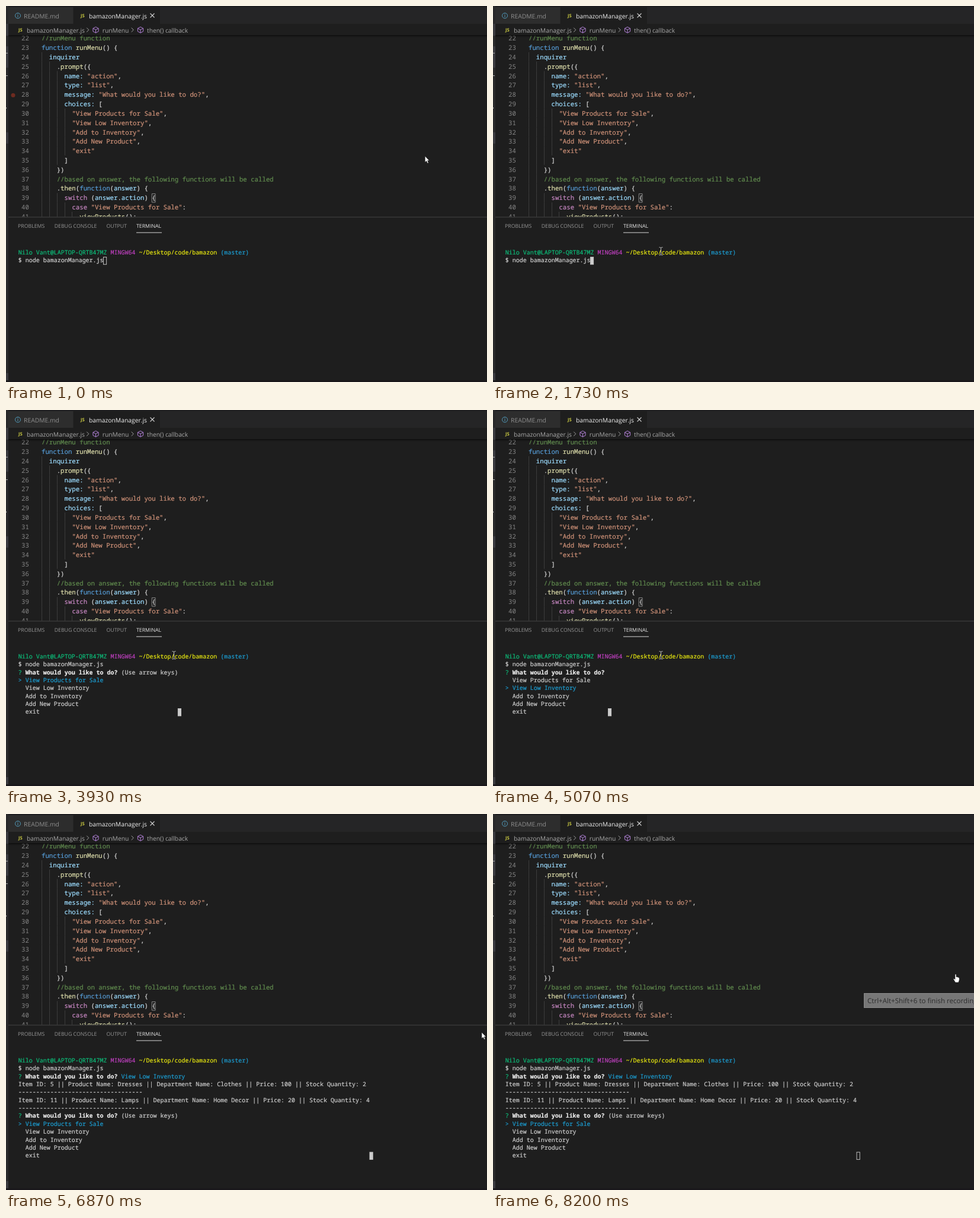
Animation, 812 px wide and 634 px high, one loop 8270 ms. Source, as an HTML page:

```html
<!DOCTYPE html>
<html lang="en">
<head>
<meta charset="utf-8">
<title>Editor and terminal</title>
<style>
html, body { margin: 0; width: 100%; height: 100%; overflow: hidden; background: #1e1e1e; }
svg { display: block; width: 812px; height: 634px; }
text { white-space: pre; text-rendering: geometricPrecision; }
.ui { font: 10.33px "Open Sans", "Noto Sans", sans-serif; fill: #a9a9a9; }
.panel { font-size: 8.75px; fill: #969696; }
.js { font: bold 7.6px "Open Sans", sans-serif; fill: #cbcb41; }
.mono, .mono tspan { fill: currentColor; stroke: currentColor; stroke-width: .22px; }
.code { font: 10.71px "Noto Sans Mono", "DejaVu Sans Mono", monospace; color: #d4d4d4; }
.term { font: 9.99px "Noto Sans Mono", "DejaVu Sans Mono", monospace; color: #cccccc; }
.num { color: #858585; stroke-width: 0; }
.line { fill: none; stroke-linejoin: round; }
</style>
</head>
<body>
<svg viewBox="0 0 812 634">
  <defs>
    <clipPath id="editorClip"><rect y="49" width="812" height="306.5"/></clipPath>
    <linearGradient id="shade" x2="0" y2="1">
      <stop stop-color="#000" stop-opacity=".55"/><stop offset="1" stop-color="#000" stop-opacity="0"/>
    </linearGradient>
    <g id="cube" class="line" stroke="#b180d7">
      <path d="M0-5 4.6-2.6V2.6L0 5-4.6 2.6V-2.6ZM-4.6-2.6 0-.2 4.6-2.6M0-.2V5"/>
    </g>
    <path id="chevron" class="line" stroke="#a0a0a0" d="M-1.8-3.6 1.8 0-1.8 3.6"/>
  </defs>

  <rect width="812" height="634" fill="#1e1e1e"/>
  <rect width="812" height="30" fill="#252526"/>
  <rect x="4" y="2" width="109" height="28" fill="#2d2d2d"/>
  <rect x="114" y="2" width="146" height="28" fill="#1e1e1e"/>
  <rect width="812" height="1.5" fill="#1a1a1c"/>

  <g class="line" stroke="#519aba"><circle cx="20" cy="16.3" r="4.5"/><path d="M20 15.3v3.6M20 13.1v1.2"/></g>
  <text class="ui" x="30" y="20.7" style="fill:#8f8f8f">README.md</text>
  <text class="js" x="126" y="19.2">JS</text>
  <text class="ui" x="140" y="20.7" style="fill:#f0f0f0">bamazonManager.js</text>
  <path class="line" stroke="#d0d0d0" stroke-width="1.1" d="M243.5 12.5l7 7m0-7l-7 7"/>

  <text class="js" x="21" y="43">JS</text>
  <text class="ui" x="35" y="44.5">bamazonManager.js</text>
  <use href="#chevron" x="138" y="40.3"/><use href="#cube" x="151.5" y="40.3"/>
  <text class="ui" x="162.7" y="44.5">runMenu</text>
  <use href="#chevron" x="213.5" y="40.3"/><use href="#cube" x="227" y="40.3"/>
  <text class="ui" x="238" y="44.5">then() callback</text>

  <g id="editor" clip-path="url(#editorClip)"></g>
  <rect x="4" y="49" width="808" height="4" fill="url(#shade)"/>
  <rect x="246.3" y="316.6" width="5.8" height="14.4" class="line" stroke="#888"/>
  <circle id="hint" cx="12" cy="150.5" r="3.5" fill="#6e2b20"/>

  <rect x="4" y="355.5" width="808" height="1" fill="#444"/>
  <g class="ui">
    <text class="panel" x="20" y="374.3">PROBLEMS</text>
    <text class="panel" x="81.7" y="374.3">DEBUG CONSOLE</text>
    <text class="panel" x="169.5" y="374.3">OUTPUT</text>
    <text class="panel" x="220" y="374.3" style="fill:#e7e7e7">TERMINAL</text>
  </g>
  <rect x="220" y="381.6" width="43" height="1" fill="#d8d8d8"/>

  <rect width="4" height="634" fill="#29292a"/>
  <path fill="#3a3a3e" d="M0 30h4v20H0zM0 68h4v36H0zM0 213h4v19H0zM0 619h4v12H0z"/>
  <path fill="#aaa" d="M0 79h3v1H0zM0 117h3v1H0zM0 171h1v2H0z"/>
  <rect y="631.5" width="812" height="2.5" fill="#19171b"/>

  <g id="terminal"></g>
  <rect id="caret" width="5.2" height="12.4" stroke="#cccccc" stroke-width=".9"/>

  <g id="tooltip">
    <rect x="626.5" y="302.5" width="200" height="24" fill="#777" stroke="#8c8c8c"/>
    <text class="ui" x="632" y="319" style="font-size:11.6px;fill:#2c2c2c">Ctrl+Alt+Shift+6 to finish recording</text>
  </g>

  <g id="mouse">
    <path id="arrow" fill="#fff" stroke="#111" stroke-width=".6" d="M0 0V10.6L2.5 8.4 4.2 12.2 6 11.4 4.4 7.7H7.4Z"/>
    <path id="beam" class="line" stroke="#c4c4c4" d="M-3-6H-1L0-5 1-6H3M0-5V6M-3 7H-1L0 6 1 7H3"/>
    <path id="hand" fill="#fff" stroke="#111" stroke-width=".5" d="M-2-6.4Q-1-7.8 0-6.4V-2.2Q1.2-3 2-1.9 3.2-2.4 3.8-1.3 5.2-1.5 5.2 0V3L3.8 7H-1.4L-4.6 1.8Q-4.8.2-3.2.8L-2 2Z"/>
  </g>
</svg>

<script>
const LOOP = 8270;
const CODE = { x: 60, y: 58.2, char: 6.426, row: 15.83 };
const TERM = { x: 20.8, y: 419, char: 5.994, row: 13.35 };
const COLORS = {
  k: '#569cd6', f: '#dcdcaa', v: '#9cdcfe', s: '#ce9178', p: '#c586c0', c: '#608b4e', w: '#d4d4d4',
  g: '#0dbc79', m: '#bc3fbc', y: '#e5e510', b: '#1c9cd0', B: '#e8e8e8', t: '#cccccc'
};
const $ = id => document.getElementById(id);
const escape = s => s.replace(/&/g, '&amp;').replace(/</g, '&lt;');

// "~k" switches to colour k; an upper-case key is also bold.
function spans(line) {
  const [plain, ...parts] = line.split(/~(\w)/);
  let out = escape(plain);
  for (let i = 0; i < parts.length; i += 2) {
    const weight = parts[i] === 'B' ? ' font-weight="bold"' : '';
    out += `<tspan style="color:${COLORS[parts[i]]}"${weight}>${escape(parts[i + 1])}</tspan>`;
  }
  return out;
}
const textLine = (cls, x, y, line) => `<text class="mono ${cls}" x="${x}" y="${y}">${spans(line)}</text>`;

const source = [
  '~c//runMenu function',
  '~kfunction ~frunMenu~w() {',
  '  ~vinquirer',
  '    .~fprompt~w({',
  '      ~vname: ~s"action"~w,',
  '      ~vtype: ~s"list"~w,',
  '      ~vmessage: ~s"What would you like to do?"~w,',
  '      ~vchoices: ~w[',
  '        ~s"View Products for Sale"~w,',
  '        ~s"View Low Inventory"~w,',
  '        ~s"Add to Inventory"~w,',
  '        ~s"Add New Product"~w,',
  '        ~s"exit"',
  '      ]',
  '    })',
  '    ~c//based on answer, the following functions will be called',
  '    .~fthen~w(~kfunction~w(~vanswer~w) {',
  '      ~pswitch ~w(~vanswer~w.~vaction~w) {',
  '        ~pcase ~s"View Products for Sale"~w:',
  '          ~fviewProducts~w();'
];

function drawEditor() {
  $('editor').innerHTML = source.map((line, i) => {
    const y = CODE.y + i * CODE.row;
    const indent = line.search(/\S/);
    let out = textLine('code num', 26, y, String(22 + i));
    for (let col = 0; col < indent; col += 2) {
      const x = Math.round(CODE.x + col * CODE.char);
      out += `<rect x="${x}" y="${y - 12}" width="1" height="${CODE.row}" fill="#3c3c3c"/>`;
    }
    return out + textLine('code', CODE.x, y, line);
  }).join('');
}

const question = '~g? ~BWhat would you like to do? ';
const choices = ['View Products for Sale', 'View Low Inventory', 'Add to Inventory', 'Add New Product', 'exit'];
const menu = (picked, note = '') => [
  `${question}~t${note}`,
  ...choices.map((c, i) => i === picked ? `~b> ${c}` : `  ${c}`)
];
const item = (id, product, department, price, stock) =>
  `Item ID: ${id} || Product Name: ${product} || Department Name: ${department} || Price: ${price} || Stock Quantity: ${stock}`;
const rule = '-'.repeat(35);
const arrowKeys = '(Use arrow keys)';
const command = [
  '~gNilo Vant@LAPTOP-QRTB47MZ ~mMINGW64 ~y~/Desktop/code/bamazon ~b(master)',
  '$ node bamazonManager.js'
];

// Each screen lasts until the next one; caret is [column, row].
const screens = [
  { at: 0, lines: command, caret: [24, 1] },
  { at: 2270, lines: command, caret: [0, 2] },
  { at: 3670, lines: [...command, ...menu(0, arrowKeys)], caret: [45, 7] },
  { at: 4730, lines: [...command, ...menu(1)], caret: [29, 7] },
  { at: 5470, caret: [99, 12], lines: [
    ...command,
    `${question}~bView Low Inventory`,
    item(5, 'Dresses', 'Clothes', 100, 2), rule,
    item(11, 'Lamps', 'Home Decor', 20, 4), rule,
    ...menu(0, arrowKeys)
  ] }
];

let shown = null;
function drawTerminal(t) {
  const screen = screens.filter(s => s.at <= t).pop();
  if (screen !== shown) {
    shown = screen;
    $('terminal').innerHTML = screen.lines
      .map((line, i) => textLine('term', TERM.x, TERM.y + i * TERM.row, line)).join('');
    const [col, row] = screen.caret;
    $('caret').setAttribute('x', TERM.x + col * TERM.char - 0.2);
    $('caret').setAttribute('y', TERM.y + row * TERM.row - 9);
  }
  const focused = t >= 800 && t < 7870;
  $('caret').setAttribute('fill', focused ? '#cccccc' : 'none');
}

// Pointer path: [time, x, y]
const path = [
  [70, 707.3, 253], [420, 480, 345], [740, 283.5, 413],
  [6200, 283.5, 413], [6500, 590, 385], [6780, 803, 368],
  [7000, 803, 368], [7400, 807, 120], [7800, 782, 277]
];
function pointerAt(t) {
  const next = path.findIndex(p => p[0] > t);
  if (next === 0) return path[0].slice(1);
  if (next < 0) return path[path.length - 1].slice(1);
  const [t0, x0, y0] = path[next - 1], [t1, x1, y1] = path[next];
  const u = (t - t0) / (t1 - t0);
  return [x0 + (x1 - x0) * u, y0 + (y1 - y0) * u];
}

const show = (id, on) => $(id).setAttribute('display', on ? 'inline' : 'none');

function render(t) {
  drawTerminal(t);
  const [x, y] = pointerAt(t);
  const overHeader = y > 352 && y < 386;
  const kind = t >= 7870 ? 'hand' : t < 130 || x > 770 || overHeader ? 'arrow' : 'beam';
  for (const id of ['arrow', 'beam', 'hand']) show(id, id === kind);
  $('mouse').setAttribute('transform', `translate(${x} ${y})`);
  show('hint', t < 130);
  show('tooltip', t >= 7870);
}

drawEditor();
const start = performance.now();
function tick() {
  render((performance.now() - start) % LOOP);
  requestAnimationFrame(tick);
}
tick();
</script>
</body>
</html>
```
